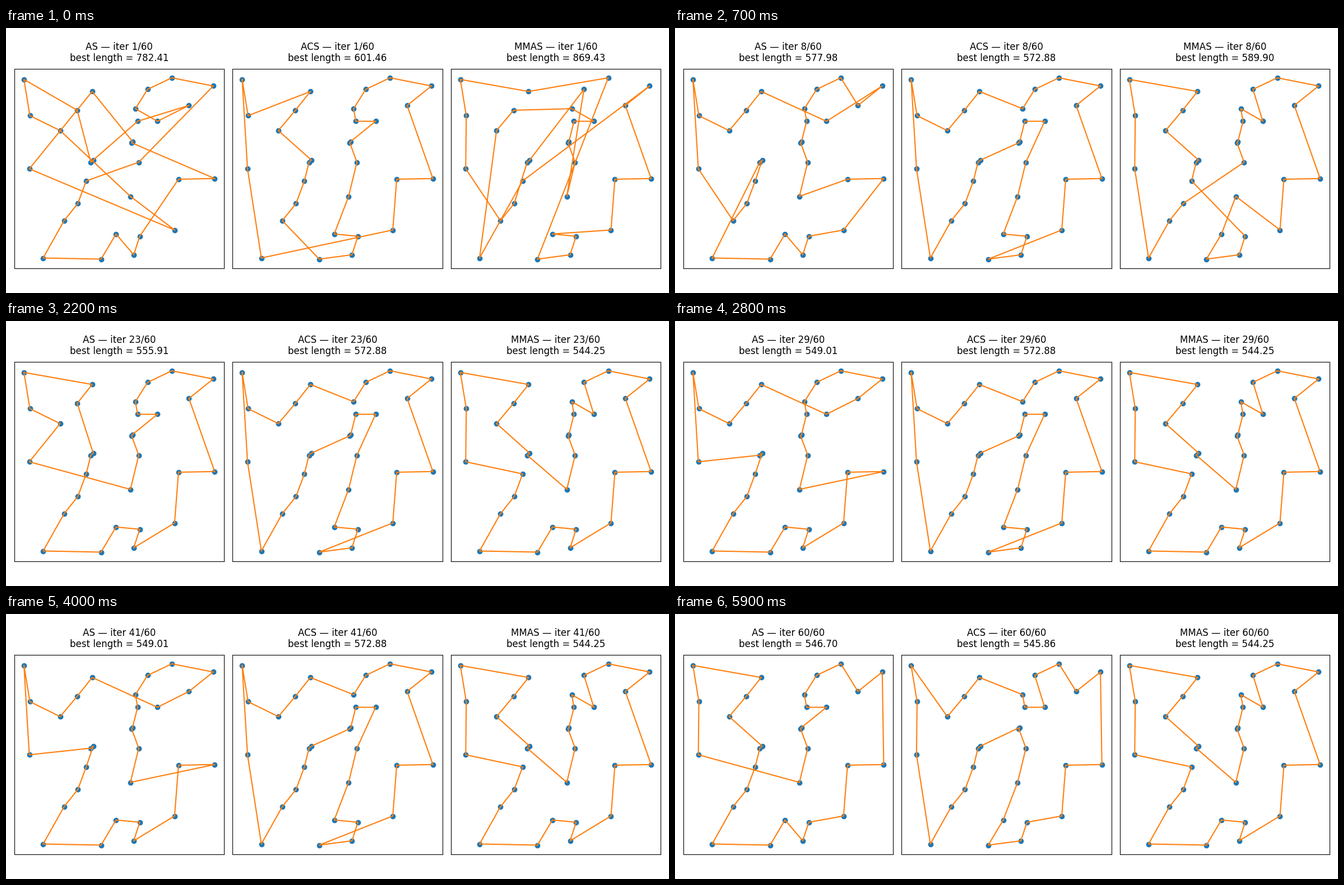
Write a matplotlib script that moves like this. It is 1183 px wide and 473 px high and loops after 6000 ms.

```python
import matplotlib.pyplot as plt
from matplotlib.animation import FuncAnimation

W, H, DPI = 1183, 473, 100
N_ITER = 60
PAD, TOP, AX_H = 15, 72.7, 356
AX_W = (W - 4 * PAD) / 3

# City positions in pixels of the first panel
CITIES = {
    "A": (32, 91.8), "B": (42.6, 156.5), "C": (96.6, 183.1), "D": (127.1, 146.8),
    "E": (153.8, 113.3), "F": (41.6, 251.3), "G": (155.6, 235.8), "H": (151.3, 239.5),
    "I": (143.1, 272.9), "J": (128.1, 313.3), "K": (103.6, 343.9), "L": (66.3, 410.5),
    "M": (169.6, 412.5), "N": (196.3, 367.7), "O": (227.9, 404.8), "P": (238.6, 371.7),
    "Q": (300.8, 360.5), "R": (307.8, 269.9), "S": (372.4, 268.7), "T": (222, 300.5),
    "U": (236.8, 239.5), "V": (224.1, 204.9), "W": (225.8, 202.5), "X": (234.8, 166.5),
    "Y": (230.9, 144), "Z": (270.2, 166.5), "a": (252.6, 109.5), "b": (295.9, 88.9),
    "c": (369.8, 103.5), "d": (326.4, 138.2),
}

# Per algorithm: (first iteration, best length, closed tour)
RUNS = {
    "AS": [
        (1, 782.41, "CTQFEWVSRPONMLKJIUcbaYZdXGHDAB"),
        (5, 577.98, "ABCDEZcdbaYXWVUTRSQPONMLHGIJKF"),
        (12, 555.91, "AEDGHIJKLMNPOQRSdcbaYXZWVUTFCB"),
        (25, 549.01, "ABCDEZdcbaYXWVUTSRQOPNMLKJIGHF"),
        (54, 546.70, "AEDCGHIJKLMNOPQRScdbaYXZWVUTFB"),
    ],
    "ACS": [
        (1, 601.46, "ABEDCGHIJKMOPNTUVWZXYabcdSRQLF"),
        (4, 572.88, "ABCDEYabcdSRQMOPNTUZXWVGHIJKLF"),
        (46, 559.59, "ACDEYXWVUTNMOPQRSdcbaZGHIJKLFB"),
        (55, 545.86, "ACDEYXZabdcSRQPOMNTUWVGHIJKLFB"),
    ],
    "MMAS": [
        (1, 869.43, "AEbMOPNQRSdcILCDYZXWVUTaGHJKFB"),
        (6, 589.90, "AEDCGHIPOMNTQRSdcbaZYXWVUJKLFB"),
        (12, 550.99, "AEDCGHIJKLMNPOQRSdcbaZYXWVUTFB"),
        (19, 544.25, "AEDCGHTUVWXYZabcdSRQOPNMLKJIFB"),
    ],
}

# The last ACS tour leaves U for V before W
RUNS["ACS"][-1] = (55, 545.86, "ACDEYXZabdcSRQPOMNTUVWGHIJKLFB")

fig = plt.figure(figsize=(W / DPI, H / DPI), dpi=DPI, facecolor="white")


def make_panel(col):
    x0 = PAD + col * (AX_W + PAD)
    ax = fig.add_axes([x0 / W, 1 - (TOP + AX_H) / H, AX_W / W, AX_H / H])
    ax.set(xlim=(PAD, PAD + AX_W), ylim=(TOP + AX_H, TOP), xticks=[], yticks=[])
    ax.scatter(*zip(*CITIES.values()), color="C0")
    line, = ax.plot([], [], color="C1")
    return line, ax.set_title("", fontsize=12, pad=10)


panels = {name: make_panel(col) for col, name in enumerate(RUNS)}


def update(frame):
    it = frame + 1
    artists = []
    for name, (line, title) in panels.items():
        _, length, tour = [best for best in RUNS[name] if best[0] <= it][-1]
        line.set_data(*zip(*(CITIES[c] for c in tour + tour[0])))
        title.set_text(f"{name} — iter {it}/{N_ITER}\nbest length = {length:.2f}")
        artists += [line, title]
    return artists


anim = FuncAnimation(fig, update, frames=N_ITER, interval=100,
                     repeat=True, repeat_delay=0, blit=False)
plt.show()
```
